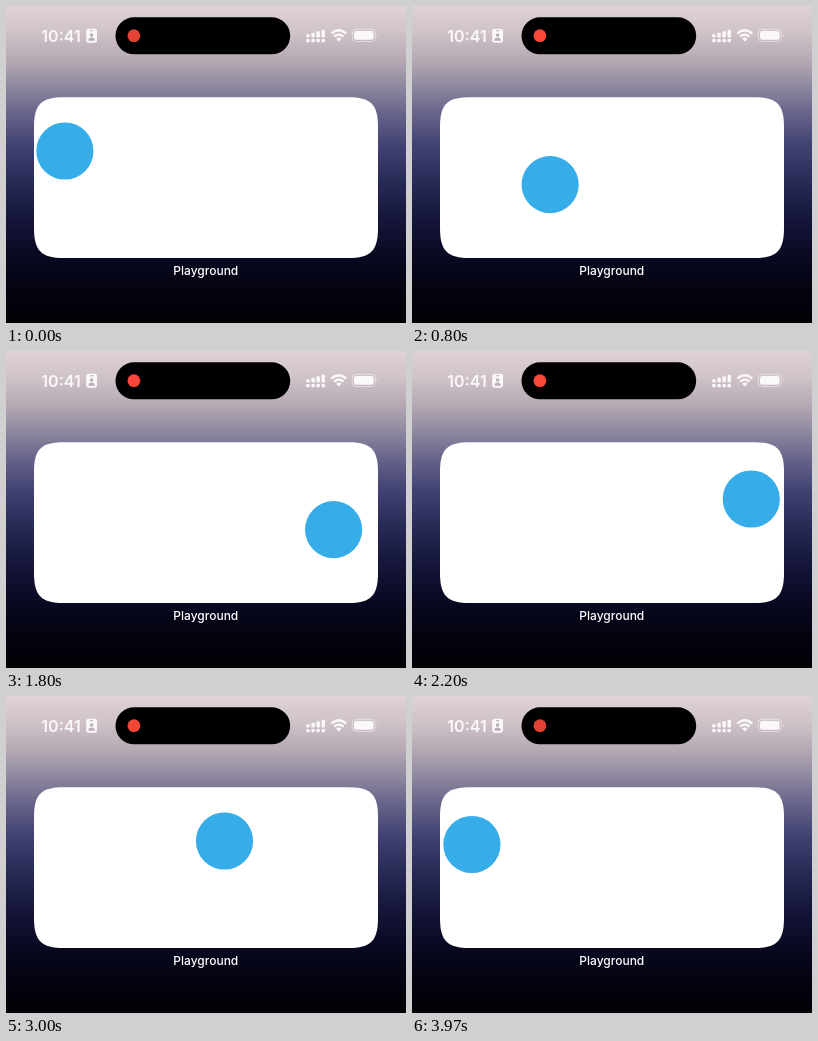
Animation of 400 by 317 pixels, one loop 4130 ms. Source, as an HTML page:

```html
<!DOCTYPE html>
<html lang="en">
<head>
<meta charset="utf-8">
<title>Playground</title>
<style>
  html, body { margin: 0; width: 100%; height: 100%; overflow: hidden; background: #020207; }
  svg { display: block; width: 100%; height: 100%; }
  text { font-family: Inter, "Liberation Sans", sans-serif; text-anchor: middle; }
</style>
</head>
<body>
<svg viewBox="0 0 400 317">
  <defs>
    <linearGradient id="sky" x1="0" y1="0" x2="0" y2="1">
      <stop offset="0" stop-color="#e0d3d6"/>
      <stop offset=".08" stop-color="#d0c3c9"/>
      <stop offset=".17" stop-color="#b5a9b4"/>
      <stop offset=".25" stop-color="#9089a0"/>
      <stop offset=".34" stop-color="#67648a"/>
      <stop offset=".44" stop-color="#414272"/>
      <stop offset=".55" stop-color="#292b57"/>
      <stop offset=".67" stop-color="#15163a"/>
      <stop offset=".8" stop-color="#080820"/>
      <stop offset=".9" stop-color="#03030f"/>
      <stop offset="1" stop-color="#010105"/>
    </linearGradient>
  </defs>
  <rect width="400" height="317" fill="url(#sky)"/>

  <rect x="109.5" y="11.3" width="174.7" height="37" rx="18.5"/>
  <circle id="recording" cx="127.9" cy="29.7" r="6.4"/>

  <g fill="#fbf8f9">
    <text x="55" y="35.6" font-size="16" font-weight="600">10:41</text>
    <rect x="80.2" y="22.8" width="10.8" height="14" rx="2.4"/>
    <g fill="#b9adb7">
      <rect x="83.8" y="24.2" width="3.6" height="1.1" rx=".5"/>
      <circle cx="85.6" cy="29" r="1.8"/>
      <path d="M82.3 34.8c0-4.4 6.6-4.4 6.6 0z"/>
    </g>
    <g id="signal"></g>
    <path d="M346.5 0" />
    <rect x="348" y="25" width="19.6" height="8.8" rx="2.4"/>
    <path d="M371.2 27.4q1.5 2 0 4z" opacity=".55"/>
  </g>
  <rect x="346.3" y="23.3" width="23" height="12.2" rx="3.8" fill="none" stroke="#fff" stroke-opacity=".45"/>
  <g fill="none" stroke="#fbf8f9" stroke-width="2.3">
    <path d="M325.4 27.7Q332.8 20.9 340.2 27.7"/>
    <path d="M328.1 30.7Q332.8 26.5 337.5 30.7"/>
  </g>
  <path d="M330.1 32.7Q332.8 30.4 335.5 32.7L332.8 35.5z" fill="#fbf8f9"/>

  <path fill="#fff" d="M28 121C28 98.2 35.2 91.3 58 91.3H342C364.8 91.3 372 98.2 372 121V222C372 244.8 364.8 252 342 252H58C35.2 252 28 244.8 28 222Z"/>
  <circle id="ball" r="28.6" fill="#36ade9"/>
  <text x="199.8" y="268.8" font-size="12" font-weight="500" fill="#fff">Playground</text>
</svg>
<script>
  const LOOP = 4130;
  const ball = document.getElementById("ball");
  const recording = document.getElementById("recording");

  document.getElementById("signal").innerHTML = [0, 1, 2, 3].map(i => {
    const x = 300.2 + i * 5.1, height = 3.4 + i * 1.5;
    return `<rect x="${x}" y="${31.6 - height}" width="3.5" height="${height}" rx="1"/>` +
           `<rect x="${x}" y="33" width="3.5" height="3.2" rx="1"/>`;
  }).join("");

  const wave = (time, period, peak) => Math.cos(2 * Math.PI * (time - peak) / period);

  // Ten pictures a second, with a longer hold on the last two.
  const snap = time => time >= 3970 ? 3970 : Math.min(3800, Math.floor(time / 100) * 100);

  function draw(now) {
    const time = snap(now % LOOP);
    ball.setAttribute("cx", 199.6 + 142 * wave(time, 4000, 2085));
    ball.setAttribute("cy", 171.5 + 31 * wave(time, 1000, 587));

    const glow = (1 + wave(time, 1333, 667)) / 2;
    recording.setAttribute("fill", `rgb(${228 + 27 * glow}, ${66 + 7 * glow}, ${52 + 7 * glow})`);
  }

  const start = performance.now();
  function tick() {
    draw(performance.now() - start);
    requestAnimationFrame(tick);
  }
  draw(0);
  requestAnimationFrame(tick);
</script>
</body>
</html>
```
